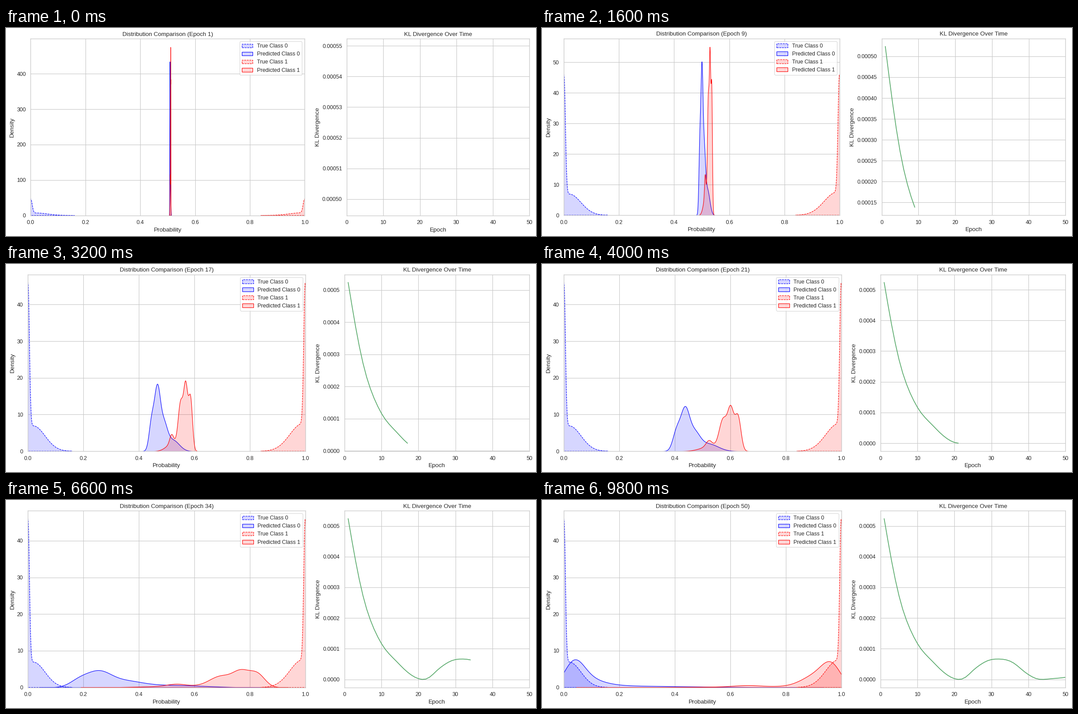
A matplotlib script that plays this animation: 1193 by 469 pixels, repeating every 10000 ms.

```python
import matplotlib.pyplot as plt
import numpy as np
from matplotlib.animation import FuncAnimation
from matplotlib.colors import to_rgba
from matplotlib.patches import Patch

WIDTH, HEIGHT, DPI = 1193, 469, 80
EPOCHS = 50
FILL_ALPHA = 0.16
BANDWIDTH = 0.25
EDGE_PEAK = 45.95

plt.rcParams.update({
    "font.family": "Liberation Sans", "font.size": 12,
    "axes.titlesize": 12, "axes.labelsize": 12,
    "xtick.labelsize": 11, "ytick.labelsize": 11, "legend.fontsize": 11,
    "text.color": "0.15", "axes.labelcolor": "0.15",
    "xtick.color": "0.15", "ytick.color": "0.15",
    "axes.edgecolor": "0.8", "axes.linewidth": 1.25, "axes.axisbelow": True,
    "axes.grid": True, "grid.color": "0.78", "grid.linewidth": 1,
    "xtick.bottom": False, "ytick.left": False,
    "xtick.major.size": 6, "ytick.major.size": 6,
    "lines.linewidth": 1.5, "patch.linewidth": 1,
})


def bell(x, centre, sigma):
    return np.exp(-0.5 * ((x - centre) / sigma) ** 2)


def smooth(x, kx, ky):
    """Cubic Hermite curve through a few key points."""
    kx, ky = np.array(kx, float), np.array(ky, float)
    slope = np.gradient(ky, kx)
    i = np.clip(np.searchsorted(kx, x) - 1, 0, len(kx) - 2)
    h = kx[i + 1] - kx[i]
    t = (x - kx[i]) / h
    return ((1 + 2 * t) * (1 - t) ** 2 * ky[i] + t * (1 - t) ** 2 * h * slope[i]
            + t * t * (3 - 2 * t) * ky[i + 1] + t * t * (t - 1) * h * slope[i + 1])


def kde(points, weights):
    mean = np.average(points, weights=weights)
    width = BANDWIDTH * np.sqrt(np.average((points - mean) ** 2, weights=weights))
    x = np.linspace(points[0] - 3 * width, points[-1] + 3 * width, 350)
    kernel = bell(x[:, None], points, width) / (width * np.sqrt(2 * np.pi))
    return x, kernel @ weights


class Scores:
    """Fixed spread of logits that drifts and stretches as training runs."""
    KEY_EPOCHS = 1, 6, 13, 21, 34, 42, 50

    def __init__(self, clusters, centres, heights):
        u = np.linspace(-0.8, 0.8, 600)
        w = sum(mass / s * bell(u, c, s) for mass, c, s in clusters)
        keep = w > 2e-3 * w.max()
        self.u, self.weights = u[keep], w[keep] / w[keep].sum()
        self.top = kde(self.u, self.weights)[1].max()
        self.centres, self.log_heights = centres, np.log(heights)

    def density(self, epoch):
        centre = smooth(epoch, self.KEY_EPOCHS, self.centres)
        height = np.exp(smooth(epoch, self.KEY_EPOCHS, self.log_heights))
        # Near p = 0.5 the sigmoid slope is 1/4, so this gain gives that height.
        gain = 4 * self.top / height
        p = 1 / (1 + np.exp(-(centre + gain * self.u)))
        return kde(p, self.weights)


# Clusters are (mass, offset, sigma).
pred0 = Scores([(0.42, -0.008, 0.049), (0.175, -0.134, 0.038),
                (0.226, 0.13, 0.069), (0.175, 0.333, 0.135)],
               centres=[0.031, 0.026, -0.055, -0.249, -1.035, -1.95, -3.05],
               heights=[434, 90, 29.5, 12.1, 3.67, 2.16, 1.85])
pred1 = Scores([(0.118, -0.294, 0.136), (0.044, -0.318, 0.024),
                (0.281, -0.116, 0.044), (0.292, -0.004, 0.027),
                (0.247, 0.103, 0.025)],
               centres=[0.041, 0.086, 0.183, 0.414, 1.211, 2.05, 2.97],
               heights=[475, 99, 31.6, 12.15, 3.67, 2.16, 1.7])

edge = np.linspace(-0.016, 0.16, 250)


def edge_density(shoulder, centre, sigma):
    """A sharp spike at the edge on top of a broad shoulder."""
    slope = shoulder * bell(np.maximum(edge, centre), centre, sigma)
    return (EDGE_PEAK - shoulder) * bell(edge, 0.0007, 0.0052) + slope


true0 = edge_density(6.9, 0.02, 0.042)
true1 = edge_density(7.5, 0.01, 0.046)

# The divergence is the square of a curve that swings through zero twice.
epochs = np.arange(1, EPOCHS + 1)
swing = smooth(epochs, [1, 6, 10, 15, 21, 25, 28, 32, 36, 40, 44, 50],
               [22.88, 15.14, 10.8, 6.86, 0.3, -5.4, -7.45, -8.15, -7.3,
                -3.95, 0.3, 2.63])
kl = swing ** 2 * 1e-6


def style(color, dashed):
    return dict(facecolor=to_rgba(color, FILL_ALPHA), edgecolor=color,
                linestyle="--" if dashed else "-", linewidth=1)


STYLES = {
    "True Class 0": style("blue", True),
    "Predicted Class 0": style("blue", False),
    "True Class 1": style("red", True),
    "Predicted Class 1": style("red", False),
}
HANDLES = [Patch(label=name, **kw) for name, kw in STYLES.items()]

fig = plt.figure(figsize=(WIDTH / DPI, HEIGHT / DPI), dpi=DPI, facecolor="white")
dist_ax = fig.add_axes([0.05, 0.1, 0.5, 0.8])
kl_ax = fig.add_axes([0.65, 0.1, 0.3, 0.8])


def place(ax, left, right, shift):
    top, bottom = 24.2 - shift, 422.6 - shift
    ax.set_position([left / WIDTH, 1 - bottom / HEIGHT,
                     (right - left) / WIDTH, (bottom - top) / HEIGHT])


def fit_layout(epoch, ymax):
    """Make room for the widest tick labels; panels keep a 3:2 ratio."""
    ticks = kl_ax.yaxis.get_major_formatter().format_ticks(kl_ax.get_yticks())
    left = 55.4 if ymax >= 100 else 49.05
    gap = 94.6 if len(ticks[-1]) > 6 else 88
    right = 1178.4
    split = left + 0.6 * (right - left - gap)
    shift = 0.5 if epoch > 1 and epoch % 2 else 0
    place(dist_ax, left, split, shift)
    place(kl_ax, split + gap, right, shift)


def draw(frame):
    epoch = frame + 1
    dist_ax.clear()
    kl_ax.clear()

    curves = [(edge, true0), pred0.density(epoch),
              (1 - edge, true1), pred1.density(epoch)]
    for (x, y), kw in zip(curves, STYLES.values()):
        dist_ax.fill_between(x, 0, y, **kw)
    ymax = 1.05 * max(y.max() for _, y in curves)
    dist_ax.set(xlim=(0, 1), ylim=(0, ymax), xlabel="Probability",
                ylabel="Density",
                title=f"Distribution Comparison (Epoch {epoch})")
    dist_ax.legend(handles=HANDLES, loc="upper right")

    kl_ax.plot(epochs[:epoch], kl[:epoch], color="#55a868")
    kl_ax.set(xlim=(0, EPOCHS), xlabel="Epoch", ylabel="KL Divergence",
              title="KL Divergence Over Time")
    fit_layout(epoch, ymax)


anim = FuncAnimation(fig, draw, frames=EPOCHS, interval=200, repeat=True,
                     repeat_delay=0)
plt.show()
```
